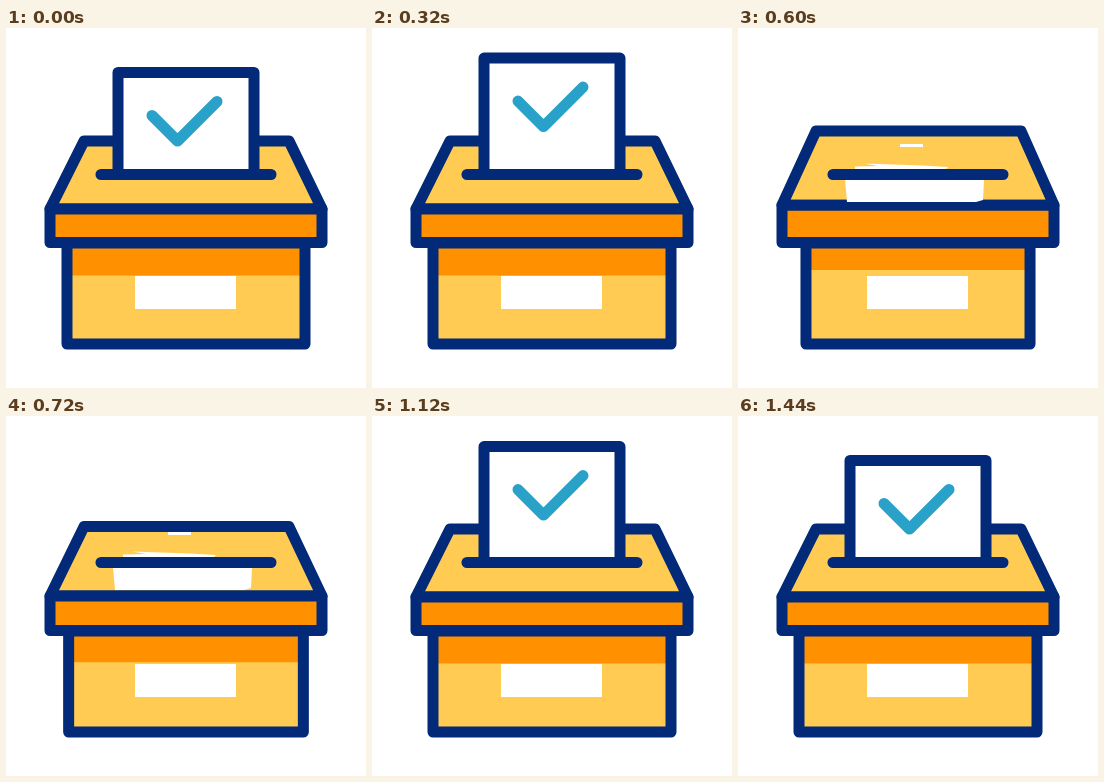
These frames come from a looping animation (360x360 px, 1.48 s). An HTML page with a canvas:

```html
<!DOCTYPE html>
<html lang="en">
<head>
<meta charset="utf-8">
<title>Ballot box</title>
<style>
html, body { margin: 0; height: 100%; overflow: hidden; background: #fff; }
canvas { display: block; }
</style>
</head>
<body>
<canvas id="stage" width="360" height="360"></canvas>
<script>
const ctx = document.getElementById('stage').getContext('2d');
const LOOP = 1480, STEP = 40;
const NAVY = '#022a78', YELLOW = '#ffcb52', ORANGE = '#ff9000', BLUE = '#29a1c9';
const REST = 44.5, PEAK = 20, SLOT = 146.5;

const clamp = x => Math.min(1, Math.max(0, x));
const part = (t, from, to) => clamp((t - from) / (to - from));
const smooth = x => x * x * (3 - 2 * x);

function shape(points, fill, stroke, closed = true) {
  ctx.beginPath();
  points.forEach(([x, y]) => ctx.lineTo(x, y));
  if (closed) ctx.closePath();
  if (fill) { ctx.fillStyle = fill; ctx.fill(); }
  if (stroke) { ctx.strokeStyle = stroke; ctx.stroke(); }
}

const box = (x1, y1, x2, y2, fill, stroke) =>
  shape([[x1, y1], [x2, y1], [x2, y2], [x1, y2]], fill, stroke);

// Top edge of the ballot: lift, drop into the slot, spring back out
function paperTop(t) {
  if (t < 390) return REST + (PEAK - REST) * smooth(part(t, 160, 390) ** 1.6);
  if (t < 958) return PEAK + (SLOT - PEAK) * part(t, 390, 524) ** 2;
  const s = 2.9, u = part(t, 958, 1440) - 1;
  return SLOT + (REST - SLOT) * (1 + (s + 1) * u ** 3 + s * u * u);
}

// How far the box is stretched upward and pinched
const stretch = t => 1.045 * (smooth(part(t, 340, 500)) - smooth(part(t, 500, 800)));

function drawBox(k) {
  const top = 113 - 13 * k, rim = 181 - 5 * k, shade = 247.5 - 7 * k;
  const left = 61 + 9 * k, right = 299 - 9 * k;
  box(left, 215, right, 316, YELLOW);
  box(left, 215, right, shade, ORANGE);
  box(129, 248, 230, 281, '#fff');
  box(left, 215, right, 316, null, NAVY);
  shape([[78, top], [283, top], [316, rim], [44, rim]], YELLOW, NAVY);
  box(44, rim, 316, 214.5, ORANGE, NAVY);
}

function drawPaper(y) {
  ctx.save();
  ctx.beginPath();
  ctx.rect(0, 0, 360, SLOT);
  ctx.clip();
  box(112, y, 248, y + 170, '#fff', NAVY);
  shape([[146, y + 43], [171.5, y + 68.5], [211, y + 29]], null, BLUE, false);
  ctx.restore();
}

// Pale traces around the slot while the ballot settles inside
function drawTraces() {
  shape([[107, 151], [246, 151], [245, 172], [238, 174], [109, 174]], '#fff');
  shape([[126, 135.5], [184, 137.5], [210, 139], [208, 141], [117, 141], [117, 138.5], [140, 138]], '#fff');
  box(162, 116, 185, 119, '#fff');
}

function draw(now) {
  const t = Math.floor(now % LOOP / STEP) * STEP;
  const y = paperTop(t);
  ctx.clearRect(0, 0, 360, 360);
  ctx.lineWidth = 11;
  ctx.lineCap = ctx.lineJoin = 'round';
  drawBox(stretch(t));
  if (t >= 560 && t < 800) drawTraces();
  if (y < SLOT) drawPaper(y);
  shape([[95, SLOT], [265, SLOT]], null, NAVY, false);
}

const start = performance.now();
function tick() {
  draw(performance.now() - start);
  requestAnimationFrame(tick);
}
tick();
</script>
</body>
</html>
```
